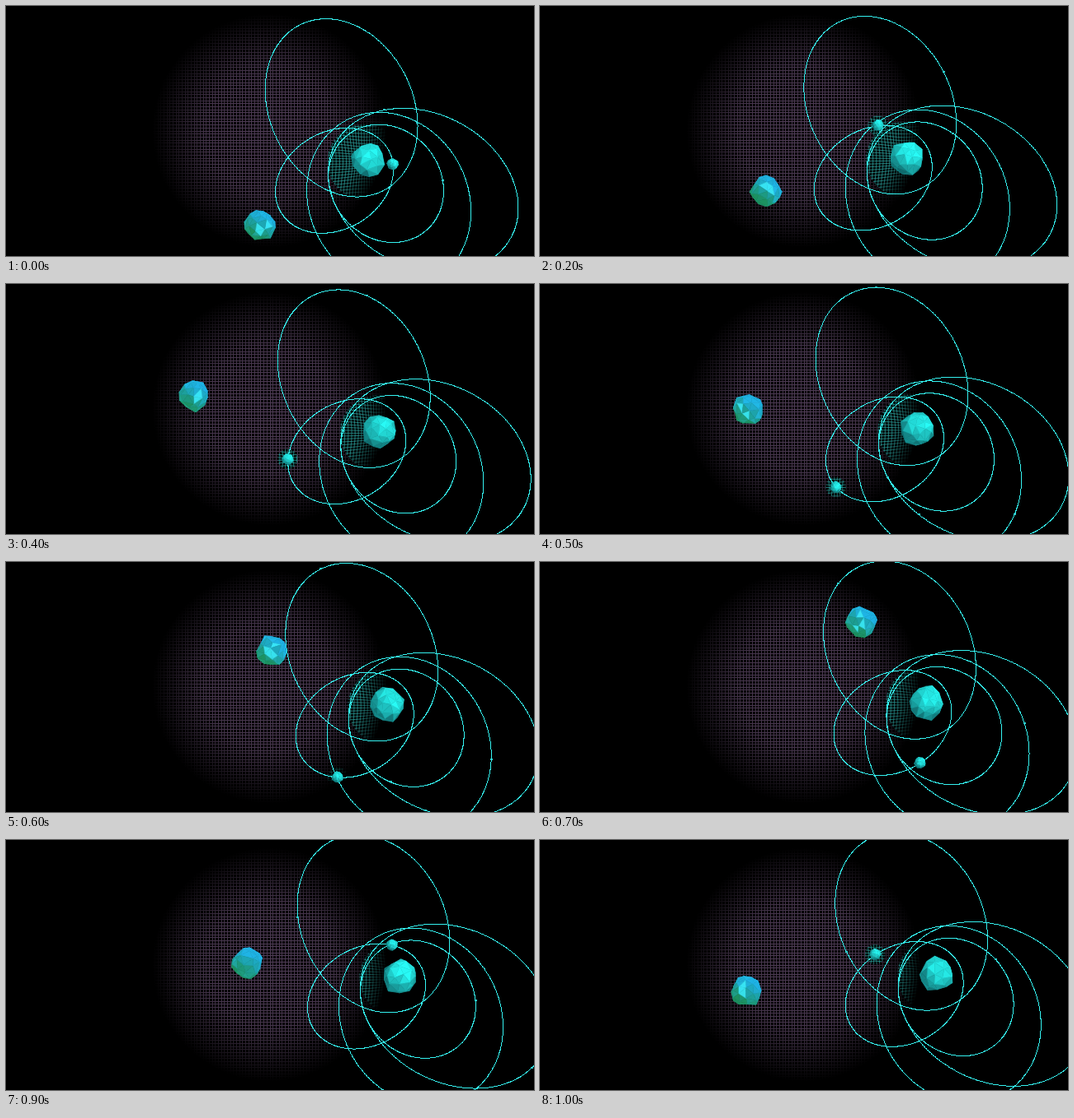
Recreate the animation shown at these times as an HTML page with a canvas. Size 640 by 304 pixels, loop 1.1 s.

```html
<!DOCTYPE html>
<html lang="en">
<head>
<meta charset="utf-8">
<title>Orbits</title>
<style>
html, body { margin: 0; width: 100%; height: 100%; overflow: hidden; background: #000; }
canvas { display: block; width: 640px; height: 304px; }
</style>
</head>
<body>
<canvas id="stage" width="640" height="304"></canvas>
<script>
const ctx = document.getElementById('stage').getContext('2d');
const TAU = Math.PI * 2, RAD = Math.PI / 180;
const STEP = 100, STEPS = 11;
const CYAN = '#34f2f0';
const MID_X = 319.5, MID_Y = 151.5, PITCH = 3.675, GRID_R = 142;

// Each orbit has the sun in one focus: centre offset, semi-major axis,
// mean anomaly at zero and per step (degrees), speed variation, moon radius.
const orbits = [
  { x: -31.5, y: -64.5, a: 112.7, m: -29.3, n: 25.2, k: .2 },
  { x: -40, y: 24, a: 75.4, m: 53, n: 49, k: .3, r: 6.7 },
  { x: 22.5, y: 27.5, a: 75.1, m: 148, n: 43.3, k: .2 },
  { x: 26, y: 48.7, a: 110.8, m: 259, n: 24, k: .2 },
  { x: 67.7, y: 36, a: 120.7, m: 55, n: 24.2, k: .2 }
];
for (const o of orbits) {
  const c = Math.hypot(o.x, o.y);
  o.b = Math.sqrt(o.a * o.a - c * c);
  o.ux = -o.x / c;
  o.uy = -o.y / c;
}

// Wandering rock, one position per step.
const path = [[308, 266], [291, 248], [274, 225], [248, 130], [228, 136], [252, 153],
  [322, 108], [390, 73], [148, 132], [292, 150], [250, 184]];

function random(seed) {
  return () => (seed = (seed * 16807) % 2147483647) / 2147483647;
}

const unit = v => {
  const l = Math.hypot(...v);
  return v.map(c => c / l);
};
const dot = (p, q) => p[0] * q[0] + p[1] * q[1] + p[2] * q[2];
const mix = (p, q, t) => p.map((c, i) => c + (q[i] - c) * t);

// Icosahedron, split once, with uneven corners.
function makeRock(seed) {
  const rnd = random(seed), g = (1 + Math.sqrt(5)) / 2, base = [], faces = [];
  for (const s of [-1, 1]) for (const t of [-g, g])
    base.push([0, s, t], [s, t, 0], [t, 0, s]);
  const near = (i, j) => Math.hypot(...base[i].map((c, n) => c - base[j][n])) < 2.1;
  const moved = {};
  const corner = v => {
    const p = unit(v), key = p.map(c => Math.round(c * 100)).join();
    moved[key] = moved[key] || p.map(c => c * .97 + (rnd() - .5) * .22);
    return moved[key];
  };
  for (let i = 0; i < 12; i++) for (let j = i + 1; j < 12; j++) for (let k = j + 1; k < 12; k++) {
    if (!near(i, j) || !near(j, k) || !near(i, k)) continue;
    const [a, b, c] = [base[i], base[j], base[k]];
    const [ab, bc, ca] = [mix(a, b, .5), mix(b, c, .5), mix(c, a, .5)];
    for (const f of [[a, ab, ca], [b, bc, ab], [c, ca, bc], [ab, bc, ca]])
      faces.push({ p: f.map(corner), tone: rnd() - .5 });
  }
  return faces;
}

const rgb = c => `rgb(${c.map(v => Math.round(Math.max(0, Math.min(255, v)))).join()})`;

function sunColor(n, tone) {
  const light = Math.max(0, dot(n, unit([.4, -.45, .8])));
  return rgb(mix([16, 110, 112], [40, 250, 246], Math.min(1, .12 + light * .88 + tone * .3)));
}

function rockColor(n, tone) {
  const side = Math.max(0, Math.min(1, .6 + n[0] * .4 - n[1] * .6 + tone * .35));
  const c = mix([28, 145, 96], [30, 178, 228], side);
  return rgb(mix(c, [60, 240, 252], n[2] > .82 && tone > .1 ? .8 : Math.max(0, tone) * .25));
}

function turn([x, y, z], a, b) {
  const x1 = x * Math.cos(a) + z * Math.sin(a), z1 = z * Math.cos(a) - x * Math.sin(a);
  return [x1, y * Math.cos(b) - z1 * Math.sin(b), y * Math.sin(b) + z1 * Math.cos(b)];
}

function drawRock(faces, x, y, r, a, b, color) {
  const list = faces.map(f => {
    const p = f.p.map(v => turn(v, a, b));
    const n = unit([0, 1, 2].map(i => p[0][i] + p[1][i] + p[2][i]));
    return { p, n, tone: f.tone };
  }).filter(f => f.n[2] > -.25).sort((f, g) => f.n[2] - g.n[2]);
  ctx.lineWidth = .5;
  for (const f of list) {
    ctx.fillStyle = ctx.strokeStyle = color(f.n, f.tone);
    ctx.beginPath();
    for (const v of f.p) ctx.lineTo(x + v[0] * r, y + v[1] * r);
    ctx.closePath();
    ctx.fill();
    ctx.stroke();
  }
}

function glow(color, inner) {
  const g = ctx.createRadialGradient(MID_X, MID_Y, 0, MID_X, MID_Y, GRID_R);
  g.addColorStop(0, `rgba(${color},1)`);
  g.addColorStop(inner, `rgba(${color},.85)`);
  g.addColorStop(1, `rgba(${color},0)`);
  return g;
}

function drawGrid() {
  const n = Math.ceil(GRID_R / PITCH);
  ctx.fillStyle = glow('80,61,87', .55);
  ctx.beginPath();
  for (let i = -n; i <= n; i++) {
    ctx.rect(Math.round(MID_X + i * PITCH), MID_Y - .5 - GRID_R, 1, GRID_R * 2);
    ctx.rect(MID_X - .5 - GRID_R, Math.round(MID_Y + i * PITCH), GRID_R * 2, 1);
  }
  ctx.fill();
}

// Part of the grid pulled towards a body.
function drawWell(cx, cy, size, pull) {
  ctx.save();
  ctx.beginPath();
  ctx.arc(cx, cy, size, 0, TAU);
  ctx.clip();
  ctx.fillStyle = '#000';
  ctx.fill();
  ctx.strokeStyle = glow('46,170,166', .78);
  ctx.lineWidth = .8;
  const reach = size * 1.3;
  const point = (x, y) => {
    const dx = x - cx, dy = y - cy, d = Math.hypot(dx, dy);
    const s = 1 - pull * Math.exp(-d * d / (size * size * .5));
    ctx.lineTo(cx + dx * s, cy + dy * s);
  };
  const snap = (v, mid, g) => mid + (Math.round((v - mid) / PITCH) + g) * PITCH + .5;
  const n = Math.ceil(reach / PITCH);
  ctx.beginPath();
  for (let g = -n; g <= n; g++) {
    const x = snap(cx, MID_X, g), y = snap(cy, MID_Y, g);
    ctx.moveTo(x, cy - reach);
    for (let t = -reach; t <= reach; t += 3) point(x, cy + t);
    ctx.moveTo(cx - reach, y);
    for (let t = -reach; t <= reach; t += 3) point(cx + t, y);
  }
  ctx.stroke();
  ctx.restore();
}

function onOrbit(o, e, sx, sy) {
  const p = o.a * Math.cos(e), q = o.b * Math.sin(e);
  return [sx + o.x + p * o.ux - q * o.uy, sy + o.y + p * o.uy + q * o.ux];
}

function moonAt(o, s, sx, sy) {
  const m = (o.m - o.n * s) * RAD;
  let e = m;
  for (let i = 0; i < 12; i++) e = m + o.k * Math.sin(e);
  return onOrbit(o, e, sx, sy);
}

const sunRock = makeRock(71), moonRock = makeRock(19), strayRock = makeRock(433);

function draw(i) {
  // The loop opens with two shorter steps.
  const s = i < 2 ? .8 + i * .6 : i;
  const sx = 433.8 + 4.74 * s, sy = 190 - 2.71 * s;
  const moons = orbits.map(o => moonAt(o, s, sx, sy));

  ctx.fillStyle = '#000';
  ctx.fillRect(0, 0, 640, 304);
  drawGrid();
  drawWell(sx - 2, sy + 2, 46, .32);
  drawWell(moons[1][0], moons[1][1], 12, .4);

  ctx.fillStyle = CYAN;
  for (const o of orbits) {
    for (let t = 0; t < 800; t++) {
      const [x, y] = onOrbit(o, t / 800 * TAU, sx, sy);
      ctx.fillRect(Math.round(x), Math.round(y), 1, 1);
    }
  }

  drawRock(sunRock, sx + .3, sy, 20.5, s * .9, s * .35, sunColor);
  orbits.forEach((o, n) => {
    const [x, y] = moons[n];
    if (o.r) return drawRock(moonRock, x, y, o.r, s, s * .6, sunColor);
    ctx.fillStyle = '#2cd0d0';
    ctx.fillRect(Math.round(x) - 1, Math.round(y) - 1, 3, 2);
  });
  drawRock(strayRock, path[i][0], path[i][1], 19, s * 1.3, s * .8, rockColor);
}

const start = performance.now();
let shown = -1;
function tick() {
  const i = Math.floor((performance.now() - start) / STEP) % STEPS;
  if (i !== shown) draw(shown = i);
  requestAnimationFrame(tick);
}
tick();
</script>
</body>
</html>
```
